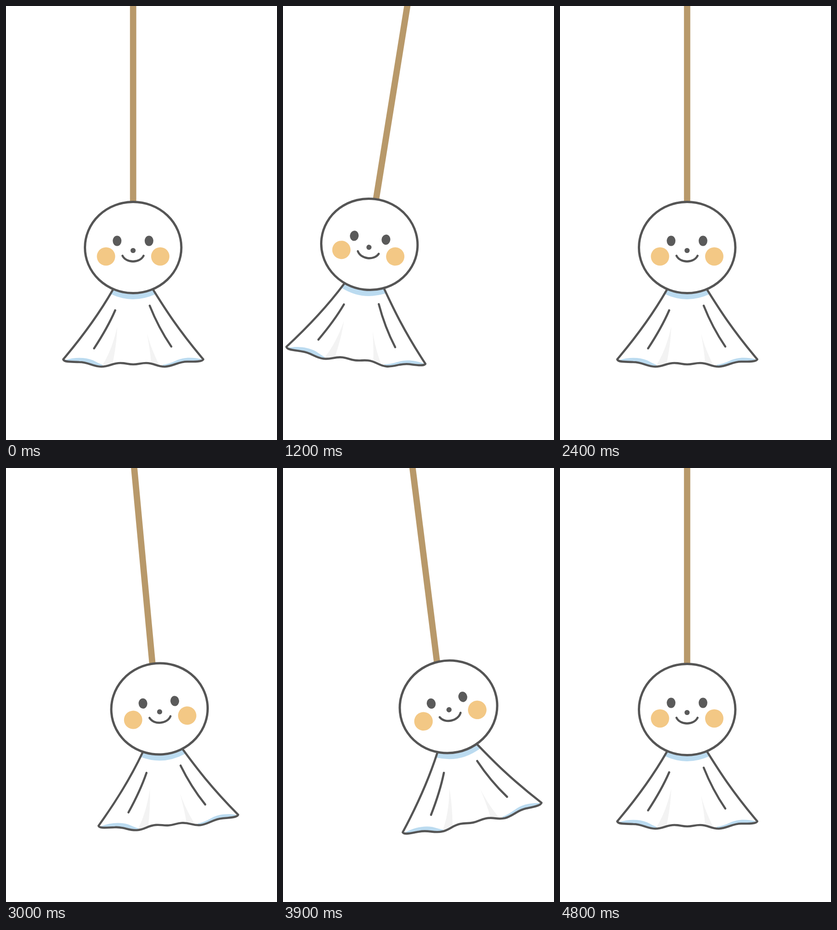
An HTML page that plays this animation: 592x947 px, repeating every 5100 ms.

```html
<!DOCTYPE html>
<html lang="en">
<head>
<meta charset="utf-8">
<title>Swinging doll</title>
<style>
  html, body { margin: 0; width: 100%; height: 100%; overflow: hidden; background: #fff; }
  svg { display: block; width: 592px; height: 947px; }
  .ink { fill: none; stroke: #555; stroke-width: 4.6; stroke-linecap: round; stroke-linejoin: round; }
  .white { fill: #fff; }
  .dark { fill: #5a5a5a; }
  .shade { fill: #bbdbf0; }
  .fold { fill: #f3f3f3; }
  .cheek { fill: #f3c885; }
</style>
</head>
<body>
<svg viewBox="0 0 592 947">
  <path id="rope" fill="none" stroke="#b8996a" stroke-width="13.8"/>
  <g id="doll">
    <path class="white" d="M233 620L125 771L208 787L347 787L431 771L322 620Z"/>
    <path class="shade" d="M234 619L230 629Q277 651 326 629L321 619Z"/>
    <path class="shade" d="M128 773C150 766 172 766 190 773C198 777 205 781 213 784L208 787C190 786 180 777 160 777Q140 777 128 773Z"/>
    <path class="shade" d="M428 771C404 765 386 767 371 774C360 779 350 782 341 783L347 787C366 786 376 776 396 776Q415 776 428 771Z"/>
    <path class="fold" d="M243 700C235 735 224 763 210 785L233 780C238 755 242 730 243 700Z"/>
    <path class="fold" d="M308 714C312 738 316 760 317 780L335 784C324 762 314 738 308 714Z"/>
    <path class="ink" d="M233 620C210 660 180 706 125 771C127 778 146 776 160 777C180 777 190 787 208 787C226 787 232 779 250 779C262 779 266 782 278 782C290 782 294 779 306 779C324 779 329 787 347 787C366 786 376 776 396 776C410 776 428 777 431 771C376 706 347 660 322 620"/>
    <path class="ink" d="M238.5 664Q222 702 192.5 747M314 654Q333 702 361 743"/>
    <ellipse class="ink" style="fill:#fff;stroke-width:5" cx="277.75" cy="527" rx="105.3" ry="99.5"/>
    <circle class="cheek" cx="218.5" cy="546.5" r="20"/>
    <circle class="cheek" cx="337" cy="546.5" r="20"/>
    <ellipse class="dark" cx="242.7" cy="512.5" rx="9.5" ry="11.2"/>
    <ellipse class="dark" cx="312.4" cy="512.5" rx="9.5" ry="11.2"/>
    <circle class="dark" cx="277.6" cy="533.5" r="5.6"/>
    <path class="ink" d="M254.5 545C263 561.5 292 561.5 300.5 545"/>
  </g>
</svg>
<script>
  const STEP = 300, ROPE_END = 440;
  const HEAD = { x: 277.75, y: 527 };

  // Each pose: head shift x, y, tilt in degrees, scale, rope x at top and at ROPE_END
  const poses = {
    rest: [0, 0, 0, 1, 277.7, 277.7],
    left1: [-29.3, 3.5, 2, 1, 277.7, 253],
    left2: [-47, 0.5, 4, 1, 277.7, 238],
    left3: [-72.5, -2.5, 5.5, 1, 275.5, 218],
    left4: [-89, -7, 7, 1, 271.5, 200.3],
    right1: [34, 1, -2.5, 1, 278, 303],
    right2: [57.5, -1.5, -4.5, 1, 280, 321],
    right3: [83.75, -6, -12, 1.013, 283, 338.5],
    right4: [108, -11, -13, 1.014, 285, 355]
  };
  const order = [
    'rest', 'left1', 'left2', 'left3', 'left4', 'left3', 'left2', 'left2',
    'rest', 'right1', 'right2', 'right3', 'right4', 'right3', 'right2', 'right1', 'rest'
  ];

  const doll = document.getElementById('doll');
  const rope = document.getElementById('rope');
  let shown = '';

  function pose(name) {
    if (name === shown) return;
    shown = name;
    const [dx, dy, tilt, scale, top, end] = poses[name];
    const above = top - (end - top) * 20 / ROPE_END;
    rope.setAttribute('d', `M${above} -20L${end} ${ROPE_END}`);
    doll.setAttribute('transform',
      `translate(${HEAD.x + dx} ${HEAD.y + dy}) rotate(${tilt}) scale(${scale}) translate(${-HEAD.x} ${-HEAD.y})`);
  }

  const start = performance.now();
  function tick() {
    const elapsed = performance.now() - start;
    pose(order[Math.floor(elapsed / STEP) % order.length]);
    requestAnimationFrame(tick);
  }
  tick();
</script>
</body>
</html>
```
